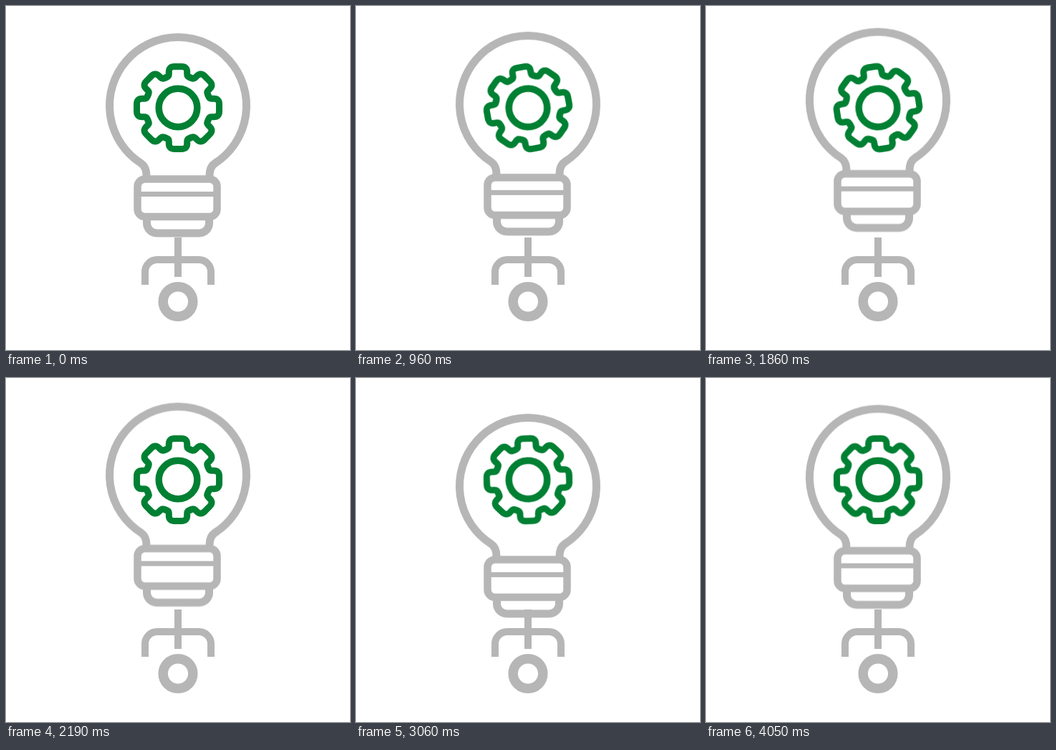
Recreate the animation shown at these times as an HTML page without scripts. Size 480 by 480 pixels, loop 4.53 s.

```html
<!DOCTYPE html>
<html lang="en">
<head>
<meta charset="utf-8">
<title>Idea bulb</title>
<style>
  html, body { margin: 0; width: 100%; height: 100%; overflow: hidden; background: #fff; }
  svg { display: block; width: 100%; height: 100%; }
  .line { fill: none; stroke: #b6b6b6; stroke-width: 11; }
  .stand { stroke-width: 10; }
  .gear { fill: none; stroke: #008033; stroke-width: 9; stroke-linecap: round; stroke-linejoin: round; }
  .bulb, .gear {
    animation: 4530ms cubic-bezier(.37, 0, .63, 1) infinite;
  }
  .bulb { animation-name: float; }
  .gear { animation-name: spin; }
  @keyframes float {
    0%, 10.6% { transform: translateY(0); }
    39.74% { transform: translateY(-7.5px); }
    68.87% { transform: translateY(12px); }
    79.47%, 100% { transform: translateY(-.5px); }
  }
  @keyframes spin {
    0%, 10.6% { transform: rotate(0deg); }
    44.48%, 60.93% { transform: rotate(360deg); }
    90.29%, 100% { transform: rotate(720deg); }
  }
</style>
</head>
<body>
<svg viewBox="0 0 480 480">
  <defs>
    <path id="tooth" d="M-17.4-42L-15-43Q-12.7-44-12.7-47V-50Q-12.7-57.5-5-57.5H5Q12.7-57.5 12.7-50V-47Q12.7-44 15-43L17.4-42"/>
    <g id="pair">
      <use href="#tooth"/>
      <use href="#tooth" transform="rotate(45)"/>
    </g>
  </defs>

  <g class="line stand">
    <path d="M240 323V378"/>
    <path d="M194 389V371a17 17 0 0 1 17-17H269a17 17 0 0 1 17 17V389"/>
    <circle cx="240" cy="412.5" r="20.8" stroke-width="13.5" style="stroke-width:13.5"/>
  </g>

  <g class="line bulb">
    <path d="M196 240V237C196 228 193 222.500 188.500 219.500A95.500 95.500 0 1 1 291.500 219.500C287 222.500 284 228 284 237V240"/>
    <rect x="183.500" y="241.500" width="111" height="52.500" rx="10.500" style="stroke-width:10.500"/>
    <path d="M184 262.500H294" style="stroke-width:7"/>
    <path d="M196.500 296V303a14 14 0 0 0 14 14H269.500a14 14 0 0 0 14-14V296"/>
  </g>

  <g transform="translate(240 142)">
    <g class="gear">
      <circle r="26.800" style="stroke-width:9.500"/>
      <use href="#pair"/>
      <use href="#pair" transform="rotate(90)"/>
      <use href="#pair" transform="rotate(180)"/>
      <use href="#pair" transform="rotate(270)"/>
    </g>
  </g>
</svg>
</body>
</html>
```
